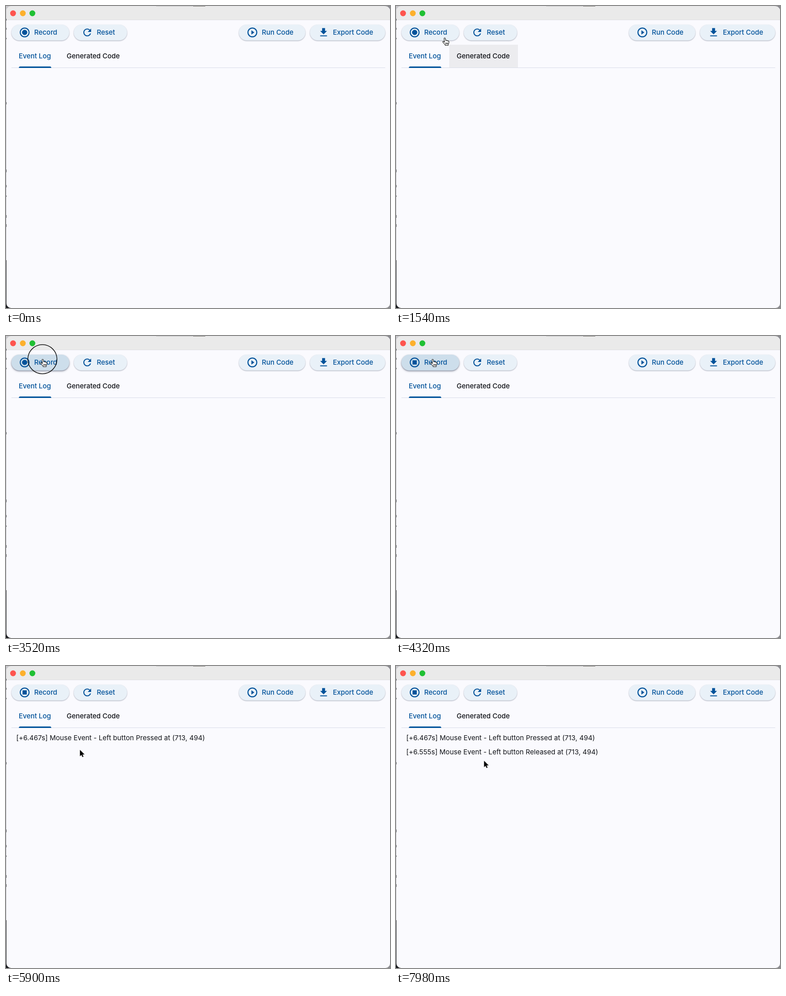
Recreate the animation shown at these times as an HTML page. Size 844x663 px, loop 8000 ms.

```html
<!DOCTYPE html>
<html lang="en">
<head>
<meta charset="utf-8">
<title>Event recorder</title>
<style>
  html, body { margin: 0; width: 100%; height: 100%; overflow: hidden; background: #fafafe; }
  svg { display: block; width: 844px; height: 663px; }
  text { font: 500 15px Inter, Roboto, sans-serif; letter-spacing: -.04px; }
  .blue { fill: #00529a; }
  .ring { fill: none; stroke: #00529a; stroke-width: 2.2; }
  .log text { font-weight: 400; letter-spacing: .04px; fill: #111318; }
  .btn { fill: #e9f1f8; filter: drop-shadow(0 1px 1px rgba(20, 30, 60, .36)); }

  /* Hard state changes */
  .state { opacity: 0; animation: 8s step-end infinite; }
  .tab-hover { animation-name: tabHover; }
  .btn-hover { animation-name: btnHover; }
  .btn-press { animation-name: btnPress; }
  .click { animation-name: click; }
  .dot { animation-name: dot; }
  .stop { animation-name: stop; }
  .pressed { animation-name: pressed; }
  .released { animation-name: released; }
  .hand { animation-name: hand; }
  .arrow { animation-name: arrow; }

  @keyframes tabHover { 0%, 19.6%, 100% { opacity: 0 } 17.4% { opacity: 1 } }
  @keyframes btnHover { 0%, 31.4%, 35.8%, 100% { opacity: 0 } 20% { opacity: 1 } }
  @keyframes btnPress { 0%, 57.5%, 100% { opacity: 0 } 36% { opacity: 1 } }
  @keyframes click { 0%, 45.5%, 100% { opacity: 0 } 43% { opacity: 1 } }
  @keyframes dot { 0% { opacity: 1 } 45.5%, 100% { opacity: 0 } }
  @keyframes stop { 0% { opacity: 0 } 45.5%, 100% { opacity: 1 } }
  @keyframes pressed { 0% { opacity: 0 } 73%, 100% { opacity: 1 } }
  @keyframes released { 0% { opacity: 0 } 75%, 100% { opacity: 1 } }
  @keyframes hand { 0%, 31.4%, 57.3%, 100% { opacity: 0 } 18.9%, 35.5% { opacity: 1 } }
  @keyframes arrow { 0%, 18.9%, 35.5% { opacity: 0 } 13%, 31.4%, 57.3%, 100% { opacity: 1 } }

  .pointer { animation: move 8s linear infinite; }
  @keyframes move {
    0%, 13% { transform: translate(330px, 520px) }
    17% { transform: translate(225px, 150px) }
    18.5% { transform: translate(150px, 95px) }
    19.25% { transform: translate(107px, 70px) }
    21% { transform: translate(92px, 62px) }
    29% { transform: translate(86px, 58px); animation-timing-function: ease-in-out }
    32%, 34% { transform: translate(76px, 38px); animation-timing-function: ease-in-out }
    37%, 56% { transform: translate(80.5px, 51px); animation-timing-function: ease-in-out }
    63%, 79% { transform: translate(162.5px, 184px); animation-timing-function: ease-in-out }
    86%, 100% { transform: translate(193.5px, 208px) }
  }
</style>
</head>
<body>
<svg viewBox="0 0 844 663">
  <!-- Desktop behind the window -->
  <rect width="844" height="663" fill="#c9c9cd"/>
  <path d="M0 558h12v105H0z" fill="#16181c"/>
  <path d="M832 0h12v12h-12zM832 651h12v12h-12z" fill="#8b8b90"/>
  <path d="M.5 28v4M.5 48v4M.5 70v3M.5 211v5M.5 359v6M.5 393v5M.5 416v3M.5 459v6M.5 479v6" stroke="#33353a"/>

  <!-- Window -->
  <rect x="1" y=".5" width="843" height="662.5" rx="10" fill="#fafafe"/>
  <path d="M1 30.5V10.5a10 10 0 0 1 10-10H834a10 10 0 0 1 10 10V30.5z" fill="#eaeaea"/>
  <path d="M1 30.5H844" stroke="#dfdfe3"/>
  <path d="M330 .3h80" stroke="#9a9a9c" stroke-width=".6"/>
  <path d="M411 .4h27" stroke="#4c4a42" stroke-width=".8"/>
  <circle cx="15.5" cy="16" r="6.4" fill="#fe544d"/>
  <circle cx="37" cy="16" r="6.4" fill="#fdb02b"/>
  <circle cx="58" cy="16" r="6.4" fill="#20c033"/>

  <!-- Toolbar -->
  <rect class="btn" x="12" y="41" width="127" height="34.5" rx="17.25"/>
  <rect class="btn" x="149" y="41" width="117" height="34.5" rx="17.25"/>
  <rect class="btn" x="512" y="41" width="146" height="34.5" rx="17.25"/>
  <rect class="btn" x="668" y="41" width="165.5" height="34.5" rx="17.25"/>
  <g class="state btn-hover">
    <rect x="12" y="41" width="127" height="34.5" rx="17.25" fill="#dbe7f2"/>
  </g>
  <g class="state btn-press">
    <rect x="12" y="41" width="127" height="34.5" rx="17.25" fill="#cddeeb" style="filter:drop-shadow(0 2px 2px rgba(20,30,60,.32))"/>
  </g>

  <circle class="ring" cx="41" cy="58" r="9.7"/>
  <circle class="blue state dot" cx="41" cy="58" r="5.8"/>
  <rect class="blue state stop" x="36.3" y="53.3" width="9.4" height="9.4"/>
  <path class="blue" transform="translate(165.7 45.2) scale(1.07)" d="M17.65 6.35C16.2 4.9 14.21 4 12 4c-4.42 0-7.99 3.58-7.99 8s3.57 8 7.99 8c3.73 0 6.84-2.55 7.73-6h-2.08c-.82 2.33-3.04 4-5.65 4-3.31 0-6-2.69-6-6s2.69-6 6-6c1.66 0 3.14.69 4.22 1.78L13 11h7V4z"/>
  <circle class="ring" cx="541.5" cy="58" r="9.7"/>
  <path class="blue" d="M539.4 53.2v9.6l6.4-4.8z"/>
  <path class="blue" transform="translate(685.2 45.2) scale(1.07)" d="M19 9h-4V3H9v6H5l7 7zM5 18v2h14v-2z"/>
  <g class="blue">
    <text x="62" y="63.3">Record</text>
    <text x="199.5" y="63.3">Reset</text>
    <text x="562.3" y="63.3">Run Code</text>
    <text x="718.5" y="63.3">Export Code</text>
  </g>

  <!-- Tabs -->
  <rect class="state tab-hover" x="117" y="85" width="151" height="50" fill="#ececef"/>
  <path d="M12 135.5H833.5" stroke="#d9dce8"/>
  <path class="blue" d="M28.3 136v-.2a3 3 0 0 1 3-3H96.500a3 3 0 0 1 3 3v.2z"/>
  <text class="blue" x="28" y="115.2">Event Log</text>
  <text x="133.300" y="115.2" fill="#111318">Generated Code</text>

  <!-- Log -->
  <g class="log">
    <text class="state pressed" x="22.500" y="162.500">[+6.467s] Mouse Event - Left button Pressed at (713, 494)</text>
    <text class="state released" x="22.500" y="194">[+6.555s] Mouse Event - Left button Released at (713, 494)</text>
  </g>

  <!-- Pointer, with its tip at the origin -->
  <circle class="state click" cx="80" cy="51" r="32" fill="none" stroke="#111" stroke-width="1.5"/>
  <g class="pointer">
    <path class="state arrow" d="M0 0V14.200l3.300-3.100 2.100 4.900 2.400-1-2.100-4.800h4.500z" fill="#000" stroke="#fff" stroke-width="1" paint-order="stroke"/>
    <path class="state hand" d="M-1.300 1.300C-1.300-.5 1.200-.5 1.500 1.200L2.400 6C3 4.800 4.800 4.900 5 6.300 5.800 5.400 7.300 5.800 7.400 7.100 8.500 6.500 9.500 7.300 9.500 8.600 9.600 11 8.800 12.400 7.800 14V16.500H1.200V15C-.4 13.500-2.300 11.600-4 9.500-4.900 8.200-3.300 7-2 8L-.3 9.500z M2.400 10.500v3.500M4.500 10.500v3.500M6.500 10.500v3.500" fill="#fff" stroke="#111" stroke-width="1.100" stroke-linejoin="round"/>
  </g>
</svg>
</body>
</html>
```
